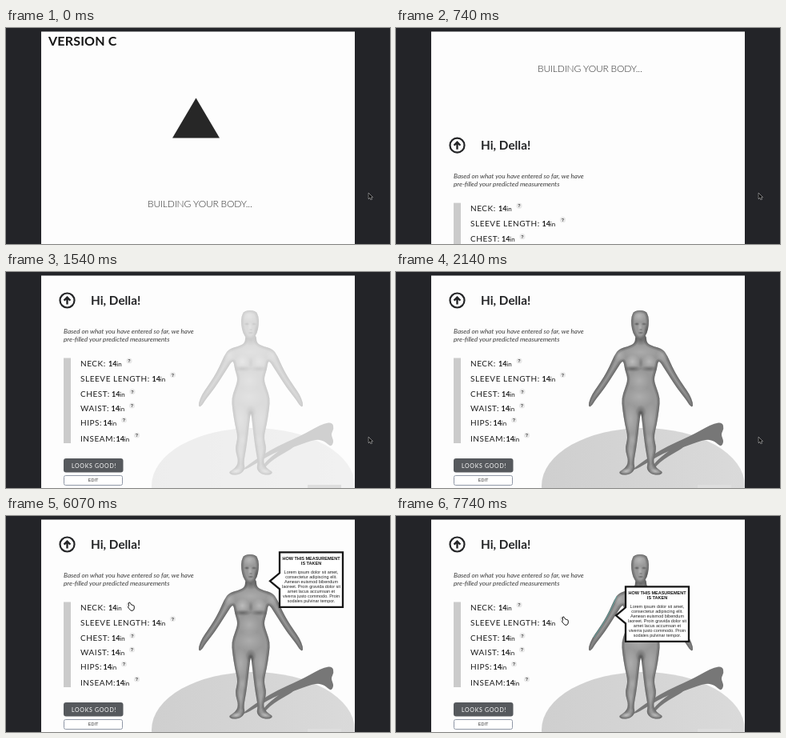
An HTML page with a canvas that plays this animation: 480 by 270 pixels, repeating every 8000 ms.

```html
<!DOCTYPE html>
<html lang="en">
<head>
<meta charset="utf-8">
<title>Body measurements</title>
<style>
html, body { margin: 0; width: 100%; height: 100%; overflow: hidden; background: #232428; }
canvas { display: block; width: 480px; height: 270px; }
</style>
</head>
<body>
<canvas id="stage"></canvas>
<script>
const W = 480, H = 270, LOOP = 8000, SCROLL = 281;
const LATO = 'Lato, "Open Sans", sans-serif';
const ARIAL = '"Liberation Sans", Arial, sans-serif';
const INK = '#242527';
const dpr = window.devicePixelRatio || 1;

function setup(canvas) {
  canvas.width = W * dpr;
  canvas.height = H * dpr;
  const c = canvas.getContext('2d');
  c.scale(dpr, dpr);
  return c;
}
const ctx = setup(document.getElementById('stage'));
const figure = document.createElement('canvas');

const clamp = v => Math.max(0, Math.min(1, v));
const ramp = (t, a, b) => clamp((t - a) / (b - a));
const smooth = p => p * p * (3 - 2 * p);
const mix = (a, b, p) => a + (b - a) * p;

function text(str, x, y, font, color = INK, spacing = 0, align = 'left') {
  ctx.font = font;
  ctx.fillStyle = color;
  ctx.letterSpacing = spacing + 'px';
  ctx.textAlign = align;
  ctx.fillText(str, x, y);
}

function poly(c, pts) {
  c.beginPath();
  pts.forEach(([x, y]) => c.lineTo(x, y));
  c.closePath();
}

// Closed soft curve: the points steer quadratic arcs between midpoints.
function curve(c, pts) {
  const n = pts.length;
  c.beginPath();
  for (let i = 0; i <= n; i++) {
    const [x, y] = pts[i % n], [u, v] = pts[(i + 1) % n];
    if (i === 0) c.moveTo((x + u) / 2, (y + v) / 2);
    else c.quadraticCurveTo(x, y, (x + u) / 2, (y + v) / 2);
  }
  c.closePath();
}

// Half an outline, as offsets from an axis, completed by its reflection.
function mirror(axis, half) {
  const right = half.map(([dx, y]) => [axis + dx, y]);
  const left = half.map(([dx, y]) => [axis - dx, y]).reverse();
  return right.concat(left);
}

function glow(c, x, y, rx, ry, tone, alpha) {
  c.save();
  c.translate(x, y);
  c.scale(rx, ry);
  const g = c.createRadialGradient(0, 0, 0, 0, 0, 1);
  g.addColorStop(0, `rgba(${tone},${tone},${tone},${alpha})`);
  g.addColorStop(1, `rgba(${tone},${tone},${tone},0)`);
  c.fillStyle = g;
  c.fillRect(-1, -1, 2, 2);
  c.restore();
}

function pair(c, x, gap, y, rx, ry, tone, alpha) {
  glow(c, x - gap, y, rx, ry, tone, alpha);
  glow(c, x + gap, y, rx, ry, tone, alpha * .85);
}

// Fills the current path and darkens its rim.
function solid(c, details) {
  c.save();
  c.fillStyle = '#989898';
  c.fill();
  c.clip();
  for (const w of [7, 4.5, 2.2]) {
    c.lineWidth = w;
    c.strokeStyle = 'rgba(60,60,60,.19)';
    c.stroke();
  }
  details();
  c.restore();
}

function drawFloor(c) {
  const floor = c.createLinearGradient(182, 0, 436, 0);
  floor.addColorStop(0, '#cfcfcf');
  floor.addColorStop(1, '#dadada');
  c.fillStyle = floor;
  c.beginPath();
  c.ellipse(309, 267, 127, 72, 0, 0, Math.PI * 2);
  c.fill();

  c.fillStyle = '#777';
  curve(c, [[293, 248], [330, 222], [370, 204], [386, 195], [398, 189], [408, 188], [410, 196],
    [406, 203], [410, 212], [406, 219], [398, 211], [386, 209], [354, 221], [336, 225], [302, 246]]);
  c.fill();
  curve(c, [[320, 249], [332, 235], [366, 216], [358, 211], [322, 238]]);
  c.fill();
}

function drawBody(c) {
  const trunk = [[7, 78], [7, 89], [16, 93], [27, 96], [33, 104]];
  const arm = [[39, 118], [46, 131], [54, 143], [61, 153], [65, 163], [65, 169], [61, 167],
    [57, 160], [45, 145], [29, 120], [22, 109]];
  const side = [[20, 122], [16, 134], [20, 146], [24, 158], [23, 171]];
  const leg = [[20, 190], [16, 207], [20, 221], [15, 237], [20, 246], [28, 250], [24, 254],
    [13, 253], [7, 246], [9, 238], [6, 222], [4, 207], [2, 190], [.5, 177]];
  curve(c, mirror(306, [...trunk, ...arm, ...side, ...leg]));
  solid(c, () => {
    glow(c, 306, 84, 11, 8, 40, .45);
    glow(c, 306, 100, 24, 10, 215, .3);
    pair(c, 306, 10.5, 112, 9, 9, 225, .5);
    pair(c, 306, 10.5, 121, 12, 4, 50, .48);
    glow(c, 306, 114, 3, 8, 60, .28);
    glow(c, 304, 136, 13, 13, 215, .35);
    glow(c, 304, 156, 18, 13, 215, .33);
    glow(c, 306, 175, 7, 9, 50, .45);
    pair(c, 306, 12.5, 184, 8, 20, 215, .32);
    pair(c, 306, 11, 210, 6, 9, 215, .28);
    pair(c, 306, 12.5, 226, 5, 14, 210, .25);
    pair(c, 306, 18.5, 249, 8, 4, 235, .5);
    pair(c, 306, 27, 104, 8, 9, 215, .35);
  });

  curve(c, mirror(305, [[7, 48], [11, 56], [11, 66], [9, 76], [4, 84]]));
  solid(c, () => {
    glow(c, 304, 55, 9, 8, 220, .45);
    glow(c, 305, 69, 3, 7, 220, .4);
    pair(c, 305.5, 4.5, 65, 3.5, 2, 35, .55);
    glow(c, 306, 72, 2.5, 1.2, 40, .4);
    glow(c, 306, 76, 4, 1.3, 40, .5);
    glow(c, 313, 73, 4, 10, 50, .3);
  });
}

function buildFigure() {
  const c = setup(figure);
  drawFloor(c);
  drawBody(c);
}

function drawIcon() {
  ctx.strokeStyle = INK;
  ctx.lineWidth = 2.2;
  ctx.beginPath();
  ctx.arc(76.5, 35.5, 9, 0, Math.PI * 2);
  ctx.stroke();
  ctx.lineWidth = 2.4;
  ctx.beginPath();
  ctx.moveTo(76.5, 40.5);
  ctx.lineTo(76.5, 32);
  ctx.moveTo(72.6, 35.6);
  ctx.lineTo(76.5, 31.6);
  ctx.lineTo(80.4, 35.6);
  ctx.stroke();
}

function box(x, y, w, h, r, fill, stroke) {
  ctx.beginPath();
  ctx.roundRect(x, y, w, h, r);
  ctx.fillStyle = fill;
  ctx.fill();
  if (stroke) {
    ctx.strokeStyle = stroke;
    ctx.lineWidth = 1;
    ctx.stroke();
  }
}

// label, baseline, value x, help y; the help mark sits 26 px after the value
const rows = [
  ['NECK:', 117.5, 128, 111],
  ['SLEEVE LENGTH:', 136.5, 182.5, 128.5],
  ['CHEST:', 155.5, 132, 149.5],
  ['WAIST:', 173.5, 131.5, 167],
  ['HIPS:', 191.5, 121.5, 185],
  ['INSEAM:', 211.5, 137.5, 204]
];

function drawIntro() {
  text('VERSION C', 53, 22.5, `700 16px ${LATO}`, '#151515', .2);
  ctx.fillStyle = '#272727';
  poly(ctx, [[237.5, 87.5], [267, 137.5], [208, 137.5]]);
  ctx.fill();
  text('BUILDING YOUR BODY...', 177, 224.5, `300 12px ${LATO}`, '#333', -.2);
}

function drawForm() {
  drawIcon();
  text('Hi, Della!', 106, 41, `700 15.3px ${LATO}`);
  const note = `italic 400 8.2px ${LATO}`;
  text('Based on what you have entered so far, we have', 72, 76.5, note, '#3a3a3a');
  text('pre-filled your predicted measurements', 72, 86.5, note, '#3a3a3a');

  ctx.fillStyle = '#cbcbcb';
  ctx.fillRect(72, 107.5, 9, 106.5);
  for (const [label, y, x, helpY] of rows) {
    text(label, 93, y, `400 10px ${LATO}`, '#1c1c1c', .55);
    text('14', x, y, `700 9px ${LATO}`, '#1c1c1c');
    text('in', x + 10.3, y, `400 8px ${LATO}`, '#1c1c1c', .1);
    ctx.fillStyle = '#e9e9e9';
    ctx.beginPath();
    ctx.arc(x + 26, helpY, 3.6, 0, Math.PI * 2);
    ctx.fill();
    text('?', x + 26, helpY + 2, `700 5.5px ${ARIAL}`, '#444', 0, 'center');
  }

  box(72, 233, 74.5, 17.5, 3, '#56595d');
  text('LOOKS GOOD!', 82, 244.5, `400 7px ${LATO}`, '#fff', .7);
  box(72.5, 254.5, 73, 12, 2, '#fff', '#8f97a6');
  text('EDIT', 109, 262.4, `400 5.5px ${ARIAL}`, '#333', 0, 'center');
  ctx.fillStyle = '#dedede';
  ctx.fillRect(377, 266, 42, 20);
}

const lorem = ['Lorem ipsum dolor sit amet,', 'consectetur adipiscing elit.',
  'Aenean euismod bibendum', 'laoreet. Proin gravida dolor sit',
  'amet lacus accumsan et', 'viverra justo commodo. Proin', 'sodales pulvinar tempor.'];

function drawTip(x, y, alpha) {
  if (!alpha) return;
  ctx.save();
  ctx.globalAlpha = alpha;
  ctx.translate(x, y);
  poly(ctx, [[0, 0], [79, 0], [79, 68.5], [0, 68.5], [0, 46], [-12, 36], [0, 26]]);
  ctx.fillStyle = '#fff';
  ctx.fill();
  ctx.strokeStyle = '#161616';
  ctx.lineWidth = 2.3;
  ctx.stroke();
  const title = `700 5.5px ${ARIAL}`;
  text('HOW THIS MEASUREMENT', 39.5, 9.3, title, '#111', 0, 'center');
  text('IS TAKEN', 39.5, 15.8, title, '#111', 0, 'center');
  lorem.forEach((line, i) =>
    text(line, 39.5, 27 + i * 6, `400 5.5px ${ARIAL}`, '#222', 0, 'center'));
  ctx.restore();
}

function drawArmLine(alpha) {
  if (!alpha) return;
  ctx.save();
  ctx.globalAlpha = alpha * .75;
  ctx.strokeStyle = '#4fb3ad';
  ctx.lineWidth = .9;
  ctx.beginPath();
  ctx.moveTo(276, 100);
  ctx.quadraticCurveTo(265, 128, 247, 152);
  ctx.stroke();
  ctx.restore();
}

function drawCursor(x, y, hand) {
  ctx.save();
  ctx.translate(x, y);
  ctx.lineJoin = 'round';
  ctx.lineWidth = .9;
  if (hand) {
    curve(ctx, [[-1, 0], [1, 0], [2.4, 3.4], [6.2, 3.6], [6.3, 7.5], [5, 10.3], [1.6, 10.3],
      [-2, 5.2], [-.2, 5]]);
    ctx.fillStyle = '#fff';
    ctx.strokeStyle = '#222';
  } else {
    poly(ctx, [[0, 0], [0, 7], [1.6, 5.6], [2.7, 8.2], [3.9, 7.7], [2.8, 5.2], [4.9, 5.1]]);
    ctx.fillStyle = '#111';
    ctx.strokeStyle = '#f4f4f4';
  }
  ctx.stroke();
  ctx.fill();
  if (hand) ctx.stroke();
  ctx.restore();
}

function render(t) {
  ctx.fillStyle = '#232428';
  ctx.fillRect(0, 0, W, H);

  ctx.save();
  ctx.beginPath();
  ctx.rect(44, 4.5, 392, 266);
  ctx.clip();
  ctx.fillStyle = '#fdfdfd';
  ctx.fillRect(44, 4, 392, 266);

  const shift = SCROLL * Math.pow(ramp(t, 0, 1070), 1.37);
  const shown = smooth(ramp(t, 1200, 2090));
  if (shown) {
    ctx.globalAlpha = shown;
    ctx.drawImage(figure, 0, 0, W, H);
    ctx.globalAlpha = 1;
  }
  if (shift < SCROLL) {
    ctx.save();
    ctx.translate(0, -shift);
    drawIntro();
    ctx.restore();
  }
  ctx.save();
  ctx.translate(0, SCROLL - shift);
  drawForm();
  ctx.restore();

  const second = ramp(t, 7480, 7700);
  drawArmLine(second);
  drawTip(342, 45.3, ramp(t, 5880, 6060) * (1 - ramp(t, 7130, 7340)));
  drawTip(287, 88.3, second);
  ctx.restore();

  const go = smooth(ramp(t, 5020, 5900));
  const next = smooth(ramp(t, 7100, 7600));
  const x = mix(mix(453.3, 154, go), 209, next);
  const y = mix(mix(206.5, 108, go), 126, next);
  drawCursor(x, y, (t > 5860 && t < 7200) || t > 7480);
}

buildFigure();
const start = performance.now();
function tick() {
  render((performance.now() - start) % LOOP);
  requestAnimationFrame(tick);
}
tick();
</script>
</body>
</html>
```
